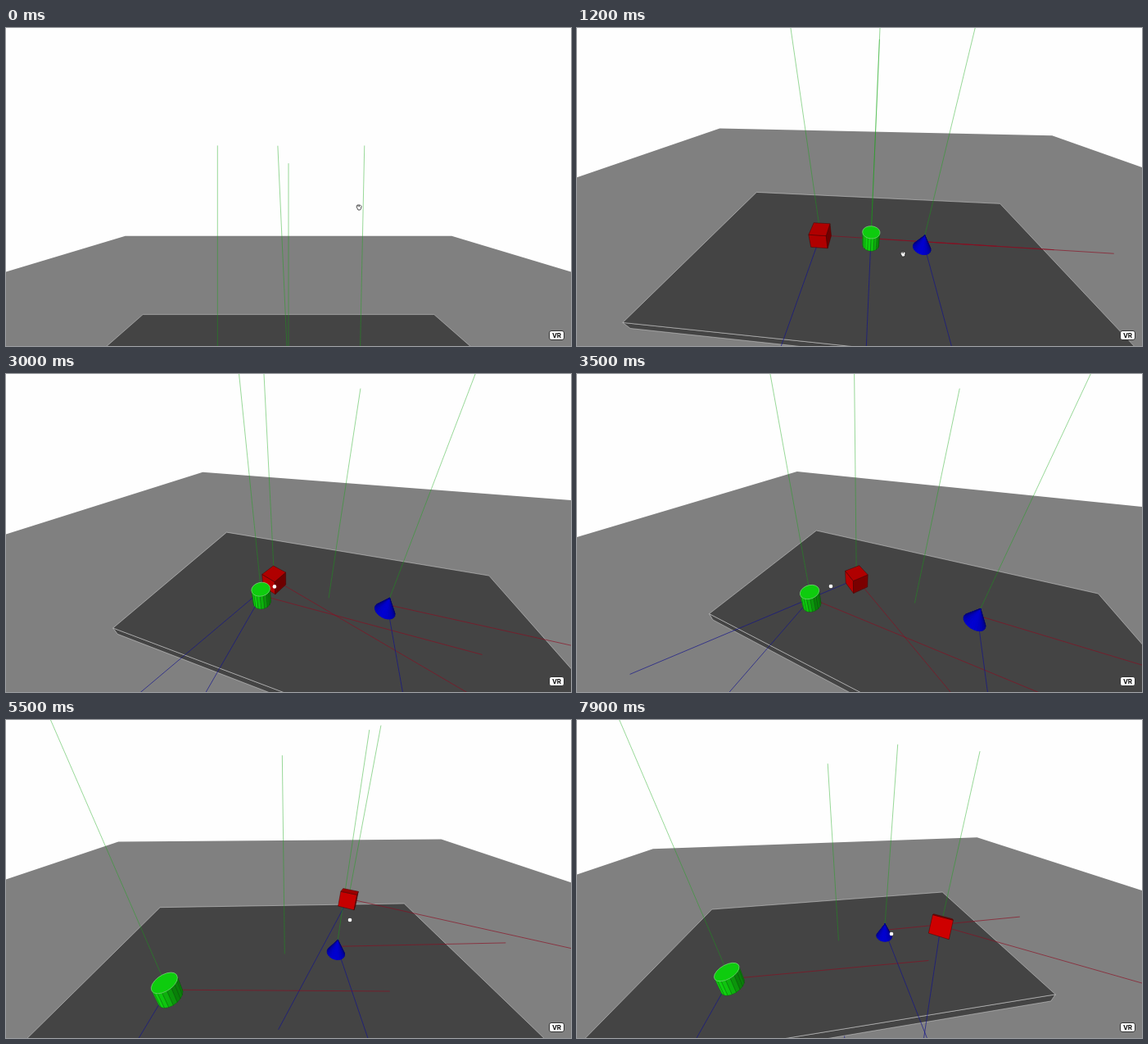
An HTML page with a canvas that plays this animation: 690x388 px, repeating every 8 s.

```html
<!DOCTYPE html>
<html lang="en">
<head>
<meta charset="utf-8">
<title>Moving solids in a 3D scene</title>
<style>
  html, body { margin: 0; width: 100%; height: 100%; overflow: hidden; background: #fefefe; }
  canvas { display: block; }
  .badge {
    position: absolute; left: 663px; top: 369px; width: 17px; height: 10px;
    border: 1px solid #333; border-radius: 3px; background: #fff; color: #111;
    font: 700 8px/10px Inter, sans-serif; text-align: center;
  }
</style>
</head>
<body>
<canvas width="690" height="388"></canvas>
<div class="badge">VR</div>
<script>
const ctx = document.querySelector('canvas').getContext('2d');
const W = 690, H = 388, LOOP = 8000, STEP = 100;
const RAD = Math.PI / 180;
const FOCAL = H / 2 / Math.tan(40 * RAD);
const EYE = 1.5, NEAR = 0.03;
const LIGHT = [-1 / 3, 2 / 3, 2 / 3];
const AXIS_COLORS = ['rgba(140,12,32,.8)', 'rgba(20,165,20,.55)', 'rgba(18,18,140,.85)'];

// Keys are [time, ...values]; values run evenly from one key to the next.
const track = (...keys) => t => {
  const i = Math.max(1, keys.findIndex(k => k[0] > t));
  const last = keys[keys.length - 1];
  if (t >= last[0]) return last.slice(1);
  const [a, b] = [keys[i - 1], keys[i]];
  const k = (t - a[0]) / (b[0] - a[0]);
  return a.slice(1).map((v, j) => v + (b[j + 1] - v) * k);
};

// yaw to the left, pitch down, distance from the table's centre
const cameraAt = track(
  [0, 0, 0, .8], [1200, 4.8, 30.8, .8], [2300, 8.5, 30.3, .8], [3500, 23, 29.6, .8],
  [4500, 23, 29.6, .8], [5500, -1.6, 26, .8], [6300, -7.6, 25.2, .8], [7200, -8.2, 25.2, .94]
);

const pointerAt = track(
  [0, 431, 219], [1200, 398, 276], [2300, 353, 260], [3500, 310, 259], [3700, 342, 255],
  [4500, 527, 262], [5500, 420, 244], [6300, 437, 241], [7200, 444, 262], [7900, 384, 261]
);

// A prism or cone around the y axis, one tenth high
function prism(n, radius, taper = 1) {
  const ring = (y, r) => Array.from({ length: n }, (_, i) => {
    const a = (i + .5) / n * 2 * Math.PI;
    return [r * Math.cos(a), y, r * Math.sin(a)];
  });
  const low = ring(-.05, radius), high = ring(.05, radius * taper);
  const sides = low.map((p, i) => [p, low[(i + 1) % n], high[(i + 1) % n], high[i]]);
  return [low, ...sides, high];
}

const block = prism(4, .05 * Math.SQRT2);
const table = {
  faces: block.map(f => f.map(([x, y, z]) => [x * 20, y / 2, z * 10])),
  color: [85, 85, 85], edge: 'rgba(215,215,215,.65)',
  pose: track([0, 0, .6, 0, 0, 0, 0])
};

// Poses: x, y, z, then yaw, pitch and roll in degrees
const solids = [
  {
    faces: block, color: [220, 0, 0], edge: 'rgba(70,0,0,.6)',
    pose: track(
      [0, -.3, .675, 0, 0, 0, 0], [2300, -.3, .675, 0, 0, 0, 0],
      [3500, -.36, .675, 0, -36, 0, 0], [3700, -.36, .675, 0, -36, 0, 0],
      [4500, .425, .835, -.255, -27, -15, 0], [5500, .425, .835, -.255, -27, -15, 0],
      [6300, .65, .868, -.23, -33, -12, 0], [7200, .556, .83, .187, -36, -30, 0]
    )
  },
  {
    faces: prism(18, .05), color: [18, 255, 18], edge: 'rgba(0,70,0,.3)', rim: 'rgba(150,240,150,.7)',
    pose: track(
      [0, 0, .675, 0, 0, 0, 2.6], [1200, 0, .675, 0, 0, 0, 0], [1900, 0, .675, 0, 0, 0, 0],
      [2300, -.12, .675, 0, 0, 0, 0], [3500, -.53, .675, .235, -2, 0, 0]
    )
  },
  {
    faces: prism(24, .05, 0), color: [0, 0, 225],
    pose: track([0, .3, .675, 0, 0, 0, -1.2], [1200, .3, .675, 0, 0, 0, 0])
  }
];

const add = (a, b) => a.map((v, i) => v + b[i]);
const sub = (a, b) => a.map((v, i) => v - b[i]);
const dot = (a, b) => a.reduce((sum, v, i) => sum + v * b[i], 0);
const cross = ([a, b, c], [x, y, z]) => [b * z - c * y, c * x - a * z, a * y - b * x];

function spin(a, b, degrees) {
  const c = Math.cos(degrees * RAD), s = Math.sin(degrees * RAD);
  return [a * c - b * s, a * s + b * c];
}

function place([x, y, z], [px, py, pz, yaw, pitch, roll]) {
  [x, y] = spin(x, y, roll);
  [y, z] = spin(y, z, pitch);
  [z, x] = spin(z, x, yaw);
  return [x + px, y + py, z + pz];
}

let camera;

// World point to right, up and forward as seen from the camera
function view([x, y, z]) {
  const [yaw, pitch, distance] = camera;
  const [depth, right] = spin(distance - z, x, yaw);
  const [forward, up] = spin(depth, y - EYE, pitch);
  return [right, up, forward];
}

// Cuts a path at the near plane and returns its points on the stage.
function project(points, closed) {
  const seen = points.map(view), kept = [];
  seen.forEach((p, i) => {
    if (p[2] > NEAR) kept.push(p);
    const q = seen[i + 1] || (closed && seen[0]);
    if (q && (p[2] > NEAR) !== (q[2] > NEAR)) {
      const k = (NEAR - p[2]) / (q[2] - p[2]);
      kept.push(p.map((v, j) => v + (q[j] - v) * k));
    }
  });
  return kept.map(([r, u, f]) => [W / 2 + FOCAL * r / f, H / 2 - FOCAL * u / f]);
}

function trace(points, fill, stroke) {
  ctx.beginPath();
  points.forEach(([x, y]) => ctx.lineTo(x, y));
  if (fill) {
    ctx.closePath();
    ctx.fillStyle = fill;
    ctx.fill();
  }
  if (stroke) {
    ctx.strokeStyle = stroke;
    ctx.stroke();
  }
}

function drawSolid({ faces, color, edge, rim }, pose) {
  const eye = [0, EYE, camera[2]];
  faces.forEach((face, i) => {
    const points = face.map(p => place(p, pose));
    let normal = cross(sub(points[1], points[0]), sub(points[2], points[0]));
    if (dot(normal, sub(points[0], pose.slice(0, 3))) < 0) normal = normal.map(v => -v);
    if (dot(normal, sub(eye, points[0])) <= 0) return;
    const lit = Math.max(0, dot(normal, LIGHT) / Math.hypot(...normal));
    const fill = `rgb(${color.map(v => v * (.5 + .45 * lit))})`;
    const cap = i === faces.length - 1;
    trace([...project(points, true)], fill, cap && rim || edge || fill);
  });
}

function drawAxis(pose, i, from = 0) {
  const at = length => place([0, 1, 2].map(j => j === i ? length : 0), pose);
  trace(project([at(from), at(1)]), null, AXIS_COLORS[i]);
}

function drawPointer(t) {
  ctx.save();
  ctx.translate(...pointerAt(t));
  if (t < 1900) {
    trace([[-3, -1], [-2, -3], [1.5, -3], [3, -1.5], [2.5, 1.5], [1.5, 3], [-1, 3]], '#fff', '#222');
    for (const x of [-1, .5]) trace([[x, -2.5], [x, -1]], null, '#222');
  } else {
    ctx.beginPath();
    ctx.arc(0, 0, 2.3, 0, 2 * Math.PI);
    ctx.fillStyle = '#fff';
    ctx.fill();
  }
  ctx.restore();
}

function render(t) {
  camera = cameraAt(t);
  ctx.fillStyle = '#fefefe';
  ctx.fillRect(0, 0, W, H);
  ctx.lineWidth = .8;

  const floor = [[-5, 0, -5], [5, 0, -5], [5, 0, 5], [-5, 0, 5]];
  trace(project(floor, true), '#808080');

  const base = table.pose(t);
  drawAxis(base, 2);
  drawSolid(table, base);
  drawAxis(base, 1, .025);

  const items = solids.map(solid => ({ solid, pose: solid.pose(t) }));
  for (const { pose } of items) for (let i = 0; i < 3; i++) drawAxis(pose, i);
  items.sort((a, b) => view(b.pose)[2] - view(a.pose)[2]);
  for (const { solid, pose } of items) drawSolid(solid, pose);
  drawPointer(t);
}

const start = performance.now();
function tick() {
  const t = (performance.now() - start) % LOOP;
  render(Math.floor(t / STEP) * STEP);
  requestAnimationFrame(tick);
}
tick();
</script>
</body>
</html>
```
